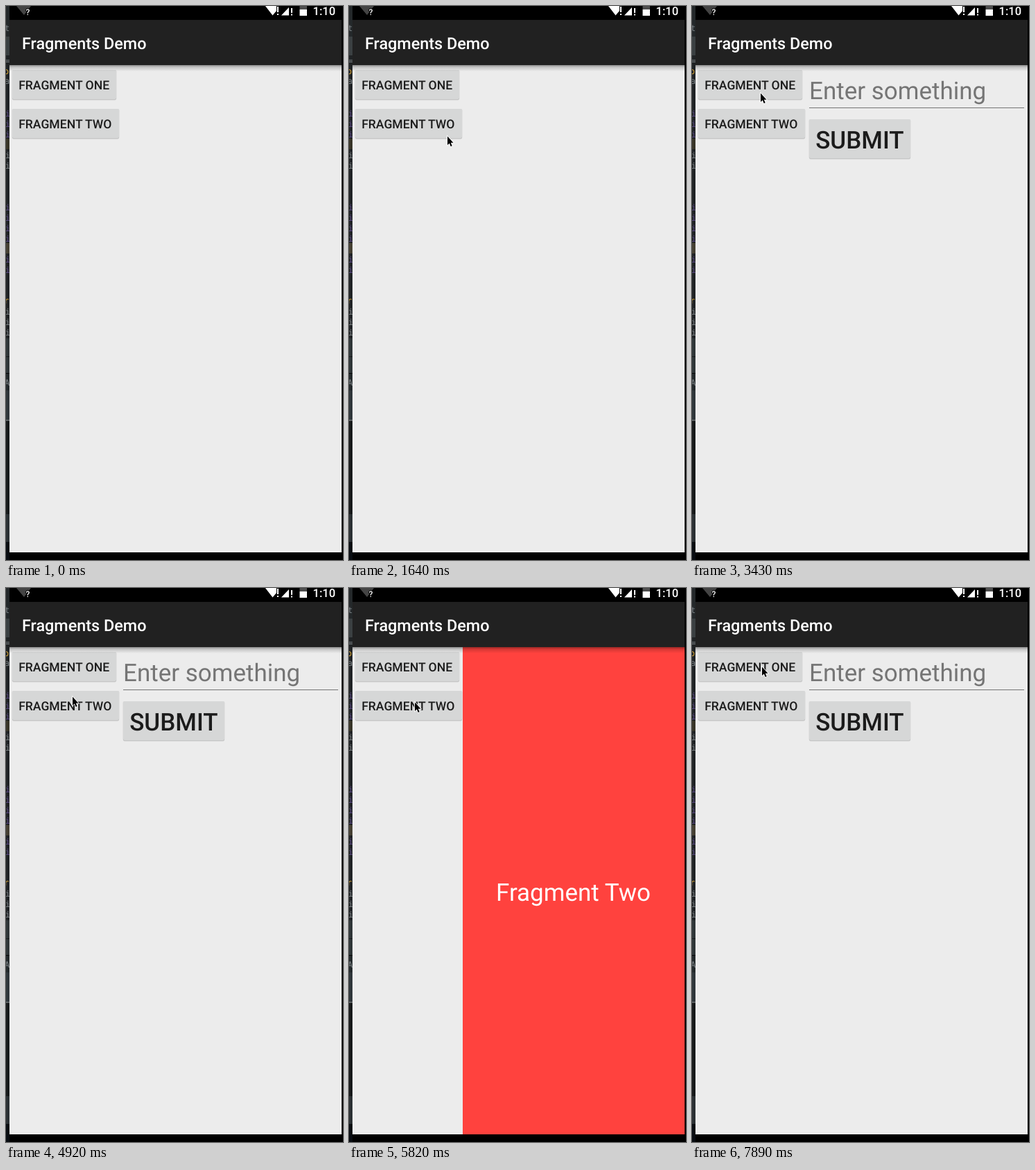
Write an HTML page that moves like this. It is 486x797 px and loops after 8 s.

```html
<!DOCTYPE html>
<html lang="en">
<head>
<meta charset="utf-8">
<title>Fragments Demo</title>
<style>
  html, body { margin: 0; width: 100%; height: 100%; overflow: hidden; background: #000; }
  svg { display: block; }
  text { font-family: Roboto, sans-serif; text-rendering: geometricPrecision; white-space: pre; }
  .medium { font-weight: 500; }
  .label { font-size: 17.6px; fill: #1b1b1b; }
  .big { font-size: 35px; }
  .code { font: 12px "DejaVu Sans Mono", monospace; }
  .key { fill: #d6a434; }
  .var { fill: #5b4a86; }
  .dim { fill: #7d8386; }
</style>
</head>
<body>
<svg width="486" height="797" viewBox="0 0 486 797">
  <defs>
    <linearGradient id="shade" x2="0" y2="1">
      <stop offset="0" stop-opacity=".4"/>
      <stop offset=".35" stop-opacity=".16"/>
      <stop offset="1" stop-opacity="0"/>
    </linearGradient>
    <clipPath id="edge"><path d="M0 0H5V797H0Z"/></clipPath>
  </defs>
  <rect width="486" height="797"/>

  <!-- sliver of the editor behind the emulator -->
  <g id="editor" clip-path="url(#edge)"></g>

  <!-- status bar -->
  <path d="M15 0H36L26 13Z" fill="#444"/>
  <text class="medium" x="28.5" y="12.5" font-size="12" fill="#fff" stroke="#000" stroke-width="2" paint-order="stroke">?</text>
  <g fill="#fff">
    <path d="M374 0H390V7L384.500 13.500Z"/>
    <path d="M391 1H393V9H391ZM391 11H393V13H391Z"/>
    <path d="M397 13.500L408 2V13.500Z"/>
    <path d="M411 3H413V10H411ZM411 11.500H413V13.500H411Z"/>
    <path d="M423.500 0H434V5H423.500Z" fill="#4d4d4d"/>
    <path d="M423.500 5H434V14H423.500Z"/>
    <text class="medium" x="442.500" y="12.500" font-size="16.5">1:10</text>
  </g>

  <!-- app -->
  <rect x="5" y="20" width="479" height="65" fill="#212121"/>
  <rect x="5" y="85" width="479" height="701" fill="#ececec"/>
  <text class="medium" x="23" y="62" font-size="23.4" fill="#fff">Fragments Demo</text>

  <g id="one">
    <text class="big" x="169" y="134" fill="#757575">Enter something</text>
    <rect x="169" y="146" width="310" height="1" fill="#757575"/>
  </g>
  <g id="two">
    <rect x="164" y="85" width="320" height="701" fill="#ff423e"/>
    <text class="big" x="212" y="450" fill="#fff">Fragment Two</text>
  </g>
  <g id="menu"></g>
  <rect x="5" y="85" width="479" height="9" fill="url(#shade)"/>

  <path id="cursor" d="M2 1.500V14L4.800 11.400L6.700 16L8.700 15.200L6.800 10.700H10.500Z" stroke="#fff" stroke-width="1.600" paint-order="stroke"/>
</svg>
<script>
const $ = id => document.getElementById(id);
const add = (id, markup) => $(id).insertAdjacentHTML('beforeend', markup);

function button(parent, x, y, w, h, text, type, baseline) {
  add(parent, `
    <rect x="${x}" y="${y + 1.5}" width="${w}" height="${h}" rx="2" fill="#000" opacity=".13"/>
    <rect x="${x - .5}" y="${y}" width="${w + 1}" height="${h + .5}" rx="2" fill="#000" opacity=".08"/>
    <rect x="${x}" y="${y}" width="${w}" height="${h}" rx="2" fill="#d6d7d7"/>
    <text class="medium ${type}" x="${x + 9.2}" y="${baseline}" fill="#1b1b1b">${text}</text>`);
}
button('menu', 9, 92, 150, 42, 'FRAGMENT ONE', 'label', 120.2);
button('menu', 9, 148, 154, 42, 'FRAGMENT TWO', 'label', 176.2);
button('one', 169, 163, 146, 56, 'SUBMIT', 'big', 205.3);

// editor panels: top, height, colour
const panels = [
  [0, 44, '#24282a'], [44, 27, '#3b4042'], [71, 407, '#202325'],
  [191, 15, '#383528'], [341, 15, '#454033'],
  [478, 50, '#2f3638'], [504, 1, '#181b1c'], [529, 24, '#242a2c'],
  [553, 42, '#2f363a'], [595, 2, '#5b6062'], [597, 134, '#17191a'],
  [731, 40, '#2b3033'], [771, 26, '#080c11']
];
for (const [y, h, fill] of panels) add('editor', `<rect y="${y}" width="5" height="${h}" fill="${fill}"/>`);

const code = (text, y, type, x = -1) =>
  add('editor', `<text class="code ${type}" x="${x}" y="${y}">${text}</text>`);
code('t', 36, 'dim', -2);
code('=', 83, 'dim');
code('ou', 98, 'key', -3);
code('a', 112, 'dim', -2);
for (const y of [159, 174, 189, 294, 309, 324, 339, 369, 384]) code('i', y, 'var');
for (const y of [219, 234, 444, 459, 474]) code('i', y, 'dim');
code('ro', 428, 'key', -3);
code('A', 546, 'dim', -2);

// pointer stops: time, x, y
const stops = [
  [900, 357, 476], [1050, 354, 459], [1200, 345, 449], [1350, 190, 243],
  [1640, 140, 186], [1790, 118, 152], [1940, 115, 147], [2090, 99, 129],
  [2230, 97, 124], [4920, 94, 155], [5070, 93, 163], [7000, 93, 139],
  [7150, 99, 113], [7300, 99, 112]
];
const show = (id, on) => $(id).setAttribute('visibility', on ? 'visible' : 'hidden');

function draw(now) {
  const t = now % 8000;
  const two = t >= 5820 && t < 7890;
  show('two', two);
  show('one', t >= 3430 && !two);
  const stop = stops.findLast(s => s[0] <= t);
  show('cursor', stop);
  if (stop) $('cursor').setAttribute('transform', `translate(${stop[1]} ${stop[2]})`);
  requestAnimationFrame(draw);
}
draw(performance.now());
</script>
</body>
</html>
```
